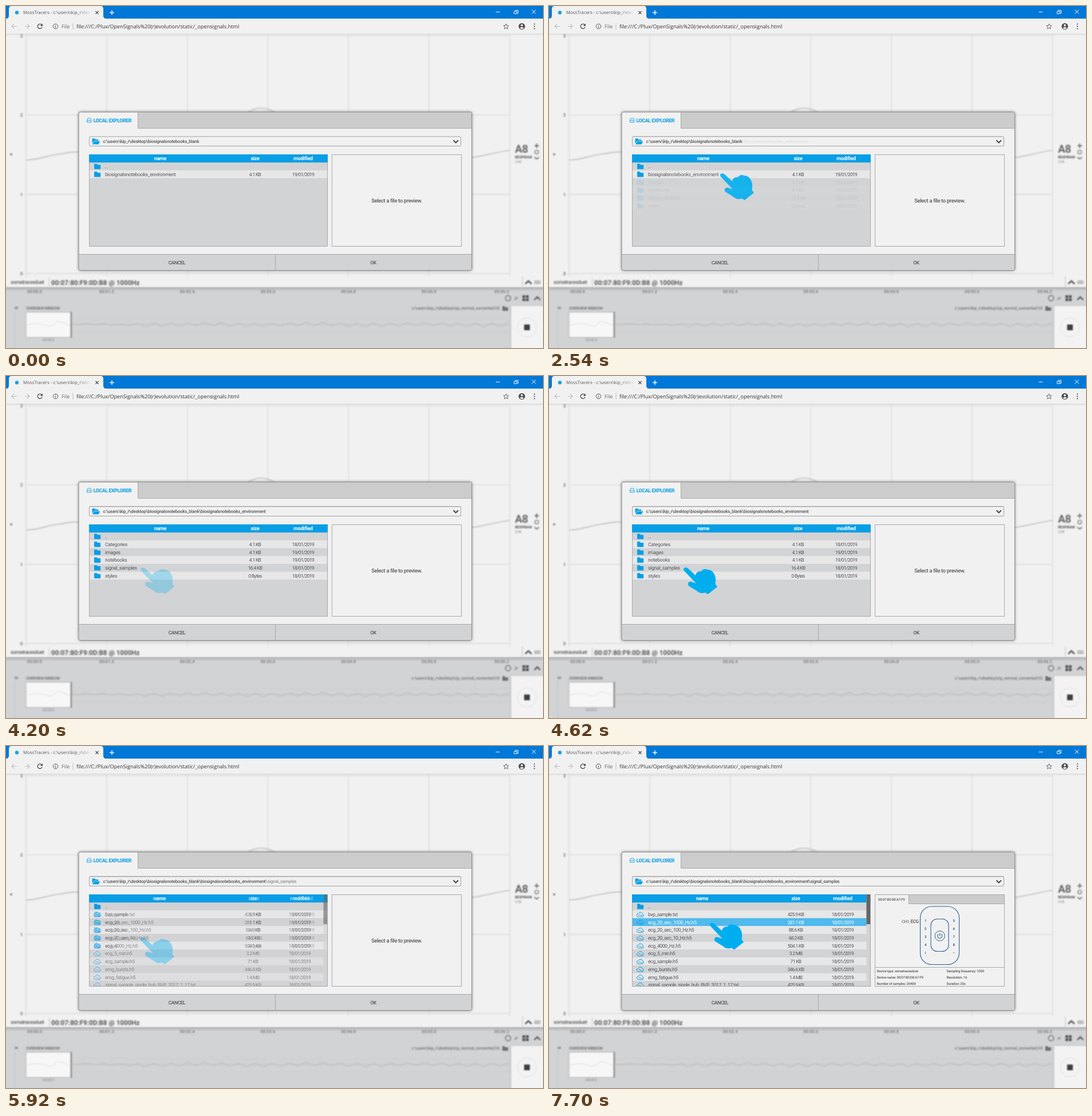
Animation, 938 px wide and 597 px high, one loop 8 s. Source, as an HTML page:

```html
<!DOCTYPE html>
<html lang="en">
<head>
<meta charset="utf-8">
<title>Local explorer</title>
<style>
  html, body { margin: 0; width: 100%; height: 100%; overflow: hidden; background: #f1f1f1; }
  svg { display: block; width: 938px; height: 597px; }
  text { font-family: Roboto, sans-serif; letter-spacing: -.034em; text-rendering: geometricPrecision; white-space: pre; }
  .tight { letter-spacing: -.058em; }
  .digits { letter-spacing: -.08em; }
  .loose { letter-spacing: 0; }
  .ui text { font-family: "Open Sans", sans-serif; letter-spacing: 0; }
  .blur { filter: blur(1.15px); }
</style>
</head>
<body>
<svg id="stage" viewBox="0 0 938 597" xmlns="http://www.w3.org/2000/svg"></svg>
<script>
const BLUE = '#089fe6', PAPER = '#f1f1f1', GREY = '#d2d3d5', INK = '#565659', HAND = '#00aeef';
const LOOP = 8000, STEP = 60, STEPS = 10;
const FADES = [1000, 2540, 4080, 5620, 7160];

const text = (x, y, size, str, { fill = INK, weight = 400, anchor = 'start', cls = '' } = {}) =>
  `<text x="${x}" y="${y}" font-size="${size}" fill="${fill}" font-weight="${weight}" text-anchor="${anchor}" class="${cls}">${str}</text>`;
const rect = (x, y, w, h, fill, extra = '') =>
  `<rect x="${x}" y="${y}" width="${w}" height="${h}" fill="${fill}" ${extra}/>`;
const line = (d, stroke = INK, width = 1) =>
  `<path d="${d}" fill="none" stroke="${stroke}" stroke-width="${width}"/>`;
const shape = (d, fill) => `<path d="${d}" fill="${fill}"/>`;
const circle = (x, y, r, fill, stroke = 'none', width = 1) =>
  `<circle cx="${x}" cy="${y}" r="${r}" fill="${fill}" stroke="${stroke}" stroke-width="${width}"/>`;
const at = (x, y, body) => `<g transform="translate(${x} ${y})">${body}</g>`;
const span = (from, to, step, fn) =>
  Array.from({ length: Math.floor((to - from) / step) + 1 }, (_, i) => fn(from + i * step, i)).join('');

function browser() {
  return `<g class="ui">
    ${rect(0, 0, 938, 22, '#0078d7')}
    ${rect(0, 22, 938, 26, PAPER)}
    ${shape('M0 22Q5 22 5 17V5Q5 0 10 0H165Q170 0 170 5V17Q170 22 175 22Z', PAPER)}
    ${circle(19, 11.5, 3.2, '#1aa3e0')}
    ${text(30, 14.3, 7.85, 'MossTracers - c:\\users\\kip_r\\des', { fill: 'url(#titleFade)' })}
    ${line('M156.5 9l5 5m0-5l-5 5', '#444', 1.1)}
    ${line('M181 11.5h8m-4-4v8', '#fff', 1.4)}
    ${line('M855.5 10.5h7M888.5 9.5h4v4h-5v-4zM889.5 9V7.5h5v5h-2M918.5 6.5l7 7m0-7l-7 7', '#fff', .9)}
    ${line('M19 35.5h-9m4-4l-4 4l4 4M33 35.5h8m-4-4l4 4l-4 4', '#c0c0c0', 1.1)}
    ${line('M62.5 33a4 4 0 1 0 .6 3.6', '#4a4a4a', 1.3)}${shape('M64 30.5v4.2h-4.2z', '#4a4a4a')}
    ${circle(86.5, 35.5, 4.2, 'none', '#555')}${line('M86.5 35v3M86.5 33v1', '#555')}
    ${text(97, 38.8, 9, 'File', { fill: '#666' })}
    ${line('M117 30v11', '#bbb')}
    ${text(123, 38.8, 9.15, 'file:///C:/Plux/OpenSignals%20(r)evolution/static/_opensignals.html', { fill: '#333' })}
    ${line('M873.5 31l1.3 3.1 3.3.3-2.5 2.2.8 3.3-2.9-1.8-2.9 1.8.8-3.3-2.5-2.2 3.3-.3z', '#555', .9)}
    ${circle(901, 35.5, 5.6, '#4a4a4a')}${circle(901, 33.7, 1.9, PAPER)}${shape('M897.3 38.4q3.7-3.2 7.4 0q-3.7 3.2-7.4 0', PAPER)}
    ${[31.5, 35.5, 39.5].map(y => circle(923, y, 1.1, '#4a4a4a')).join('')}
  </g>`;
}

function chart() {
  const gridX = span(35, 880, 140.8, x => `M${x} 49V472`);
  const gridY = span(52, 467, 138.3, y => `M32 ${y}H880`);
  const ticks = span(52, 467, 138.3, (y, i) => text(27, y + 3, 8, 3 - i, { fill: '#777', anchor: 'middle', weight: 700 }));
  return `${rect(0, 48, 938, 444, PAPER)}
  <g class="blur">
    ${line(gridX + gridY, '#dedede', 1.6)}
    ${line('M0 49H938', '#cccccc', 1.6)}
    ${ticks}
    ${circle(9, 259, 2, '#888')}
    ${line('M35 269C60 268 68 262 90 259S115 253 135 256M420 188C434 175 457 175 472 188M810 265C835 262 855 255 880 252', '#bdbdbd', 1.7)}
    ${text(889, 256, 19, 'A8', { fill: '#666', weight: 700 })}
    ${text(889, 265.5, 6.4, 'RESPIRAW', { fill: '#555', weight: 700 })}
    ${text(889, 274, 6, 'CH8', { fill: '#888' })}
    ${line('M923 244h8m-4-4v8M923 264l4 3l4-3', '#777', 2)}
    ${circle(927, 255, 3.2, 'none', '#888', 1.6)}
  </g>`;
}

function overview() {
  const wave = 'M' + span(116, 880, 3, x => {
    const amp = x < 230 ? 1.2 : 2.8;
    return `${x} ${(556 + amp * Math.sin(x / 4.7) + Math.sin(x / 31)).toFixed(1)} `;
  });
  const times = span(35, 880, 140.8, (x, i) =>
    text(Math.min(Math.max(x, 50), 866), 501, 7.5, `00:0${i}.${i * 2 % 10}`, { fill: '#808083', weight: 700, anchor: 'middle', cls: 'loose' }));
  return `${rect(0, 491, 938, 106, GREY)}
  ${rect(0, 489, 938, 9, 'url(#edge)')}
  <g class="blur">
    ${text(8, 484.5, 9, 'somatracesduet', { fill: '#606060', weight: 500, cls: 'tight' })}
    ${line('M75.5 474v16M902 472v18', '#c8c8c8', 1.2)}
    ${text(79, 486.7, 11.6, '00:07:80:F9:0D:B8 @ 1000Hz', { fill: '#555', weight: 700, cls: 'loose' })}
    ${line('M907 485l5.5-5l5.5 5', '#555', 2.6)}
    ${text(923, 485, 8, 'EEI', { fill: '#888', weight: 700 })}
    ${times}
    ${circle(877, 510, 4.6, 'none', '#777', 1.7)}
    ${line('M888 513l6-5M889 508l4 4', '#909090', 1.5)}
    ${rect(902, 505, 5, 4.5, '#555')}${rect(908, 505, 5, 4.5, '#555')}
    ${rect(902, 510.5, 5, 4.5, '#555')}${rect(908, 510.5, 5, 4.5, '#555')}
    ${line('M923 513l5-5l5 5', '#555', 2.4)}
    ${rect(15, 525, 6, 4, '#999')}
    ${text(35, 530, 7, 'OVERVIEW WINDOW', { fill: '#777', weight: 700, cls: 'tight' })}
    ${text(862, 530, 7.6, 'c:\\users\\kip_r\\desktop\\rip_normal_converted.h5', { fill: '#777', anchor: 'end', weight: 500 })}
    ${shape('M867 524h4l1 2h5v6h-10z', '#707070')}
    ${line('M15.5 533V597M880 523V597', '#c4c5c7')}
    ${line('M116 546H880M116 569H880', '#cacbcd')}
    ${line('M116 556H880', '#bebfc1')}
    ${line(wave, '#bcbdbf', 1.2)}
    ${rect(35, 534.5, 78, 44, '#f7f7f7', 'stroke="#b0b0b0"')}
    ${line('M37 557Q55 552 68 557T85 554T111 558', '#dedede')}
    ${line('M114 534v45', '#8e8e8e', 2.4)}
    ${text(74, 585, 6.5, '00:00.0', { fill: '#888', anchor: 'middle' })}
    ${rect(882, 523, 60, 80, '#f3f3f3', 'stroke="#c4c4c4"')}
    ${circle(910, 561, 16.5, 'none', '#dddddd')}
    ${rect(905, 556, 10, 10, '#3f3f3f')}
  </g>`;
}

function dialog() {
  return `<g style="filter:drop-shadow(0 0 2.5px #0008)">${rect(127, 185, 686.5, 276.5, PAPER, 'rx="3"')}</g>
    ${shape('M231 185.5H810Q813 185.5 813 188.5V213.5H231Z', '#cccccd')}
    ${line('M230.5 186V213.5H813', '#aaa')}
    ${shape('M127.5 433.5H813V458Q813 461 810 461H130Q127.5 461 127.5 458Z', GREY)}
    ${line('M127.5 433.5H813M470.5 434V461', '#a8a8aa')}
    ${rect(127, 185.2, 686.5, 276.3, 'none', 'rx="3" stroke="#8d8d8f"')}
    ${line('M143 196h4.5l1.4 3.5v3.5h-7.4v-3.5zM141.5 200h7.4', BLUE, .9)}
    ${text(152.5, 203, 9, 'LOCAL EXPLORER', { fill: BLUE, weight: 600, cls: 'tight' })}
    ${text(298.5, 451, 8.6, 'CANCEL', { weight: 500, anchor: 'middle', cls: 'tight' })}
    ${text(641.5, 451, 8.6, 'OK', { weight: 500, anchor: 'middle', cls: 'tight' })}`;
}

const folder = shape('M0 1Q0 0 1 0H4.5L6 1.8H10.2Q11.2 1.8 11.2 2.8V8.4Q11.2 9.4 10.2 9.4H1Q0 9.4 0 8.4Z', BLUE);
const openFolder = shape('M0 9V1Q0 0 1 0H4.5L6 1.7H10Q11 1.7 11 2.7V4.3H3.5Z', BLUE) +
  shape('M.5 10.2L3.6 5H13.8L11 10.2Z', BLUE);
const cloud = line('M3.2 9H10.4A2.6 2.6 0 0 0 10.8 3.9A3.8 3.8 0 0 0 3.7 3.1A3 3 0 0 0 3.2 9ZM3.5 6.8Q5.5 3.8 7.3 6T11 6.6', BLUE, 1);
const hand = (x, y) => at(x, y, shape(
  'M1 6C-2 2 3 -2 8 2L21 14C22 9 26 6 31 7C33 3 38 2 42 4C49 4 53 9 55 15C57 20 56 25 55.500 29L59 34L42.500 47L38 44C32 46 27 45 23 41L10 33C6 30 8 24 13 25L22 28Z', HAND));

function pathBox(path) {
  return rect(145.5, 228, 649, 16.5, PAPER, 'rx="2" stroke="#a2a2a4"') + at(150.5, 231.3, openFolder) +
    text(169.5, 239.3, 7.9, path, { weight: 500 }) + line('M781.5 234.5l4.2 4.2l4.2-4.2', '#444', 2);
}

// Rows are [name, size, date, isFile]; a scrolled table gives up 7px to its scrollbar.
function table(rows, { scroll = false, selected = -1 } = {}) {
  const right = scroll ? 554.5 : 562, [nameX, sizeX, dateX] = scroll ? [267.5, 431, 513] : [269.5, 435, 519];
  const head = { fill: '#fff', weight: 700, anchor: 'middle' };
  const body = rows.map(([name, size, date, isFile], i) => {
    const y = 273.2 + i * 13.7, base = y + 10, picked = i === selected;
    const tint = picked ? '#4fbaec' : i % 2 ? '#e7e7e8' : GREY, fill = picked ? '#fff' : INK;
    const cell = { fill, anchor: 'middle', cls: 'digits' };
    return rect(145.5, y, right - 145.5, 13.7, tint) +
      at(isFile ? 152.5 : 154, y + 2.2, isFile ? cloud : folder) +
      text(173, base, 8.7, name, { fill, cls: isFile ? 'tight' : '' }) +
      text(sizeX, base, 8.5, size, cell) +
      text(dateX, base, 8.5, date, cell);
  }).join('');
  return `<g clip-path="url(#tableClip)">${rect(145, 259, 417, 161, GREY)}${body}
      ${rect(145, 259, right - 145, 14.2, BLUE)}
      ${text(nameX, 269.3, 9, 'name', head)}${text(sizeX, 269.3, 9, 'size', head)}${text(dateX, 269.3, 9, 'modified', head)}
      ${scroll ? rect(554.5, 259, 7, 52, '#656567') : ''}</g>` +
    line('M145.5 273V419.5H561.5V273', '#a8a8aa');
}

const previewFrame = rect(569.5, 259.5, 226, 160, PAPER, 'stroke="#a8a8aa"');
const emptyPreview = previewFrame + text(682.5, 342.5, 9.4, 'Select a file to preview.', { weight: 500, anchor: 'middle' });

function devicePreview() {
  const navy = '#2c5f93', small = { weight: 500 };
  const channels = [['1', '5'], ['2', '6'], ['3', '7'], ['4', '8'], ['i', '–']].map((pair, i) =>
    pair.map((label, side) => text(657.5 + side * 49.5, 307.3 + i * 13.8, 6, label, { fill: navy, weight: 700, anchor: 'middle' })).join('')).join('');
  const facts = [
    ['Device type: somatracesduet', 'Sampling frequency: 1000'],
    ['Device name: 00:07:80:D8:A7:F9', 'Resolution: 16'],
    ['Number of samples: 20400', 'Duration: 20s'],
  ].map(([a, b], i) => text(572.5, 395.3 + i * 11, 6, a, small) + text(694.5, 395.3 + i * 11, 6, b, small)).join('');
  return previewFrame + rect(628.5, 259.5, 167, 16, '#cccccd', 'stroke="#a8a8aa"') +
    text(575, 269.7, 6, '00:07:80:D8:A7:F9', small) +
    text(616, 309, 7.4, 'CH1, <tspan font-size="8.2" font-weight="500">ECG</tspan>', { cls: 'tight' }) +
    rect(648.5, 280, 68, 101.5, 'none', `rx="20" stroke="${navy}" stroke-width="1.1"`) +
    rect(667, 302, 31, 56.5, 'none', `rx="11" stroke="${navy}" stroke-width="1.1"`) +
    circle(682.7, 331.5, 8.7, 'none', navy, 1) +
    line('M680.3 328.5a4 4 0 1 0 4.8 0M682.7 326.5v5', navy, 1.1) +
    channels + line('M570 386.5H795', '#a8a8aa') + facts;
}

const up = ['..', '', ''];
const root = 'c:\\users\\kip_r\\desktop\\biosignalsnotebooks_blank';
const environment = root + '\\biosignalsnotebooks_environment';
const samples = environment + '\\signal_samples';
const rootRows = [up, ['biosignalsnotebooks_environment', '4.1 KB', '19/01/2019']];
const environmentRows = [up,
  ['Categories', '4.1 KB', '18/01/2019'], ['images', '4.1 KB', '19/01/2019'], ['notebooks', '4.1 KB', '19/01/2019'],
  ['signal_samples', '16.4 KB', '18/01/2019'], ['styles', '0 Bytes', '18/01/2019']];
const sampleRows = [up, ...[
  ['bvp_sample.txt', '425.9 KB'], ['ecg_20_sec_1000_Hz.h5', '281.1 KB'], ['ecg_20_sec_100_Hz.h5', '88.6 KB'],
  ['ecg_20_sec_10_Hz.h5', '68.2 KB'], ['ecg_4000_Hz.h5', '504.1 KB'], ['ecg_5_min.h5', '3.2 MB'],
  ['ecg_sample.h5', '71 KB'], ['emg_bursts.h5', '346.6 KB'], ['emg_fatigue.h5', '1.4 MB'],
  ['signal_sample_single_hub_BVP_2017_1_17.txt', '425.9 KB'],
].map(([name, size]) => [name, size, '18/01/2019', true])];

const rootView = pathBox(root) + table(rootRows) + emptyPreview;
const environmentView = pathBox(environment) + table(environmentRows) + emptyPreview;
const scenes = [
  rootView,
  rootView + hand(299, 292),
  environmentView,
  environmentView + hand(235, 334),
  pathBox(samples) + table(sampleRows, { scroll: true }) + emptyPreview,
  pathBox(samples) + table(sampleRows, { scroll: true, selected: 2 }) + devicePreview() + hand(281, 308.5),
];

const stage = document.getElementById('stage');
stage.innerHTML = `<defs>
    <linearGradient id="titleFade" gradientUnits="userSpaceOnUse" x1="125" x2="149">
      <stop stop-color="#555"/><stop offset="1" stop-color="#555" stop-opacity="0"/></linearGradient>
    <linearGradient id="edge" x2="0" y2="1">
      <stop stop-color="#b8b8ba" stop-opacity="0"/><stop offset=".4" stop-color="#b8b8ba"/>
      <stop offset="1" stop-color="#b8b8ba" stop-opacity="0"/></linearGradient>
    <clipPath id="tableClip"><rect x="145" y="259" width="417" height="160.5"/></clipPath>
  </defs>` + chart() + overview() + browser() + dialog() +
  scenes.map(body => `<g class="scene">${body}</g>`).join('');

// Every scene is opaque, so fading each one in over the last makes a crossfade.
const layers = [...stage.querySelectorAll('.scene')];
function draw(now) {
  const t = now % LOOP;
  layers.forEach((layer, i) => {
    const elapsed = i ? t - FADES[i - 1] : LOOP;
    layer.style.opacity = elapsed < 0 ? 0 : Math.min(1, (Math.floor(elapsed / STEP) + 1) / STEPS);
  });
  requestAnimationFrame(draw);
}
draw(performance.now());
</script>
</body>
</html>
```
